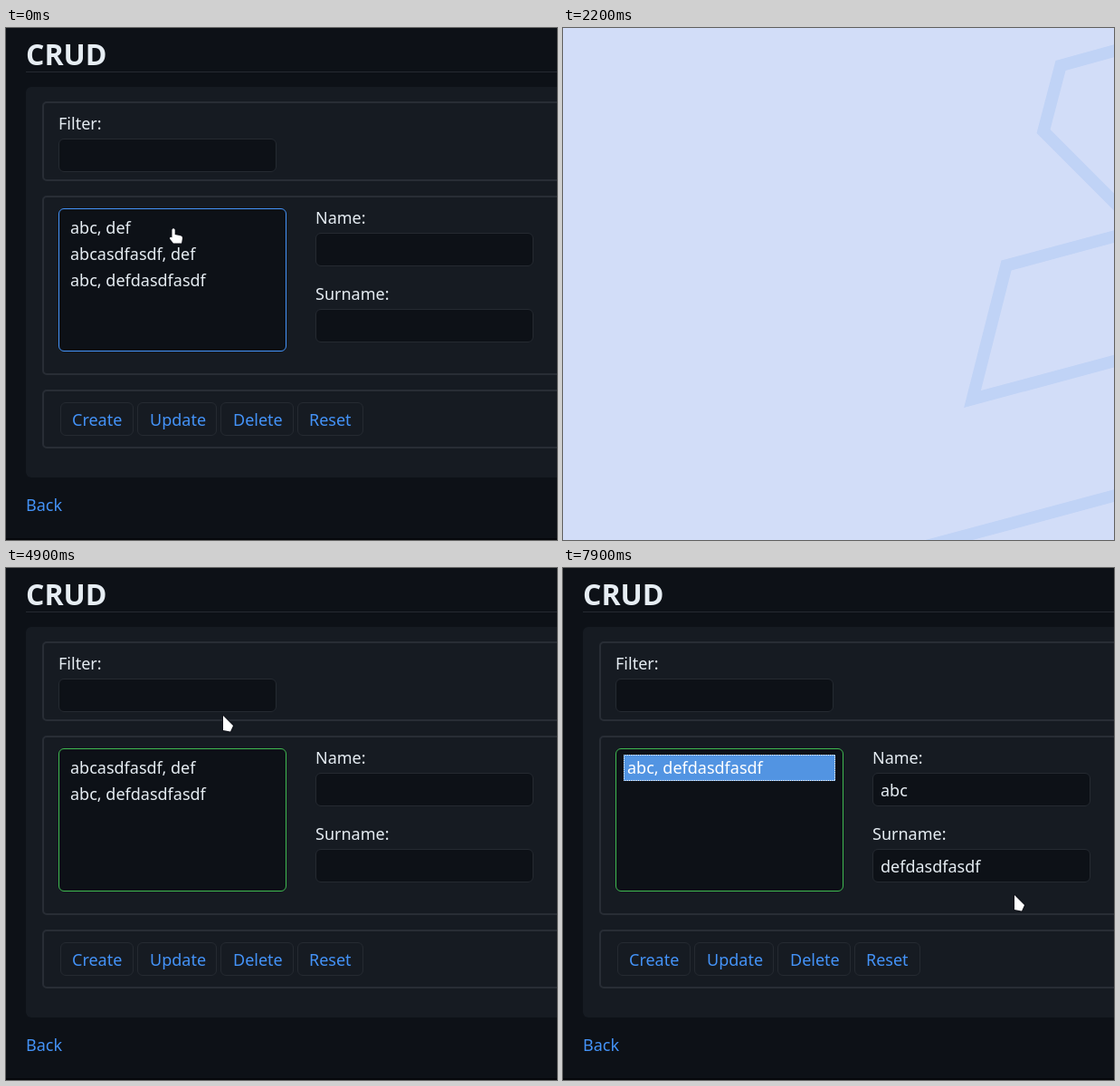
These frames come from a looping animation (609x565 px, 8000 ms). An HTML page:

```html
<!DOCTYPE html>
<html lang="en">
<head>
<meta charset="utf-8">
<title>CRUD</title>
<style>
  html, body { margin: 0; width: 100%; height: 100%; overflow: hidden; background: #0d1117; }
  svg { display: block; font: 18px "Noto Sans", sans-serif; }
  .small { font-size: 12.9px; }
  .dialog { filter: drop-shadow(0 2px 7px rgba(0, 0, 0, .3)); }
</style>
</head>
<body>
<svg id="stage" width="609" height="565" viewBox="0 0 609 565"></svg>
<script>
const LOOP = 8000, STEP = 100, MOVE = 300;
const INK = '#e6edf3', LINE = '#252a31', BG = '#0d1117', PANEL = '#161b22', BLUE = '#4493f8';
const people = [['abc', 'def'], ['abcasdfasdf', 'def'], ['abc', 'defdasdfasdf']];
const buttons = { Create: 81.7, Update: 88, Delete: 80.7, Reset: 73 };

// Each round: click the first row, then press a button until the end
const rounds = [
  { pick: 400, press: 1000, end: 2200, button: 'Delete' },
  { pick: 2900, press: 4200, end: 4300, button: 'Reset' },
  { pick: 5300, press: 6200, end: 7000, button: 'Delete' },
  { pick: 7600, press: LOOP, end: LOOP }
];
const reloads = rounds.filter(r => r.button === 'Delete').map(r => r.end);

// Pointer stops: arrival time, x, y
const stops = [
  [0, 185, 221], [500, 202, 222], [1000, 293, 425], [1600, 625, 496],
  [2800, 260, 230], [3300, 553, 404], [3900, 362, 428], [4900, 240, 163],
  [5200, 228, 218], [5700, 281, 409], [6200, 285, 422], [6400, 625, 496],
  [7500, 230, 222], [7900, 499, 361]
];

const text = (s, x, y, fill = INK, more = '') => `<text x="${x}" y="${y}" fill="${fill}" ${more}>${s}</text>`;
const rect = (x, y, w, h, fill, more = '') =>
  `<rect x="${x}" y="${y}" width="${w}" height="${h}" fill="${fill}" ${more}/>`;
const box = (x, y, w, h, fill, stroke = LINE, r = 5.5, sw = 1) =>
  rect(x + sw / 2, y + sw / 2, w - sw, h - sw, fill, `rx="${r}" stroke="${stroke}" stroke-width="${sw}"`);
const field = (label, value, x, y) =>
  text(label, x, y - 10) + box(x, y, 241, 37, BG) + text(value, x + 9, y + 26);
const mix = (a, b, k) => `rgb(${a.map((v, i) => Math.round(v + (b[i] - v) * k))})`;

// Waits at each stop, then moves just in time for the next one
function pointerAt(t) {
  const i = stops.findLastIndex(s => s[0] <= t);
  const [t0, x0, y0] = stops[i], [t1, x1, y1] = stops[i + 1] || [LOOP, x0, y0];
  const span = Math.min(MOVE, t1 - t0);
  const u = Math.max(0, (t - t1 + span) / span), k = u * u * (3 - 2 * u);
  return [x0 + (x1 - x0) * k, y0 + (y1 - y0) * k];
}

function pointer(x, y, hand) {
  const shape = hand
    ? 'M-1.5 1.5Q0-.8 1.7 1.5V7L8 8.2Q10.3 8.8 10 11L9 16.5H0L-4 11.5Q-4.2 9-1.5 10.2Z'
    : 'M0 0L11 11L8 17.5L0 16Z';
  return `<path d="${shape}" transform="translate(${x} ${y})" fill="#fff" stroke="#10131a" stroke-width="2"
    stroke-linejoin="round" paint-order="stroke"/>`;
}

function list(t, round, over) {
  const gone = reloads.filter(r => r <= t).length;
  const rows = people.slice(gone);
  const firstPick = rounds.find(r => r.pick >= (reloads[gone - 1] || 0)).pick;
  const valid = (t - firstPick - STEP) / 200;
  const border = valid >= 0 ? mix([68, 147, 248], [63, 185, 80], Math.min(1, valid))
    : over || round ? BLUE : LINE;
  const focused = round && t < round.press;
  const mark = !round ? '' : focused
    ? rect(67, 206, 234, 29, '#5294e2') + rect(67.5, 206.5, 233, 28, 'none',
      'stroke="#fff" stroke-dasharray="1" stroke-dashoffset=".5"')
    : rect(67, 206, 234, 29, '#e0e0e0');
  const [name, surname] = round && t > round.pick ? rows[0] : ['', ''];
  return box(58, 199, 252, 158, BG, border) + mark
    + rows.map((row, i) => text(row.join(', '), 71, 227 + 29 * i,
      i || !round ? INK : focused ? '#fff' : '#565c70')).join('')
    + field('Name:', name, 342, 226) + field('Surname:', surname, 342, 310);
}

function toolbar(pressed, px, py) {
  let left = 60;
  return Object.entries(buttons).map(([label, width]) => {
    const x = Math.floor(left), w = Math.floor(left + width) - x, tx = Math.round(left + 13);
    left += width + 4;
    const down = label === pressed;
    const hot = down || px >= x && px < x + w && py >= 413 && py < 450;
    return box(x, 413, w, 37, hot ? '#4089e8' : PANEL, hot ? '#4089e8' : LINE)
      + text(label, tx, 439, down ? '#c9d1d9' : hot ? INK : BLUE);
  }).join('');
}

const dialog = rect(0, 0, 609, 565, '#1c1b22', 'opacity=".45"')
  + rect(308, 398, 340, 131, '#42414d', 'rx="7" class="dialog"')
  + `<g fill="none" stroke="#fbfbfe" stroke-width="1.3"><circle cx="332.5" cy="422.5" r="7"/>
     <ellipse cx="332.5" cy="422.5" rx="3.2" ry="7"/><path d="M326 420h13M326 425h13"/></g>`
  + text('localhost:3000', 344, 427, '#fbfbfe', 'class="small" font-weight="700"')
  + text('Are you sure you want to delete?', 324, 462, '#fbfbfe', 'class="small"');

const flash = rect(0, 0, 609, 565, '#d2ddf8')
  + `<path d="M630 19.5L550 41.5L531 114L630 213M630 224.5L490 262L452.5 409.5L630 362M380 577.5L630 510.5"
     fill="none" stroke="#c0d3f6" stroke-width="13.5"/>`;

function page(t) {
  if (t === reloads[0]) return flash;
  const [px, py] = pointerAt(t);
  const round = rounds.find(r => t >= r.pick && t < r.end);
  const pressed = round && t >= round.press ? round.button : '';
  const modal = pressed === 'Delete' && t > round.press;
  const over = !modal && px >= 58 && px < 310 && py >= 199 && py < 357;
  return rect(0, 0, 609, 565, BG) + rect(0, 563, 609, 2, '#06080c')
    + text('CRUD', 22, 41, INK, 'font-size="32" font-weight="700"')
    + rect(22, 48, 587, 1, LINE)
    + rect(22, 65, 620, 431, PANEL, 'rx="6"')
    + [[81, 88], [185, 198], [399, 65]].map(([y, h]) => box(40, y, 600, h, 'none', '#282d35', 4, 2)).join('')
    + field('Filter:', '', 58, 122)
    + list(t, round, over)
    + toolbar(pressed, modal ? -1 : px, py)
    + text('Back', 22, 533, BLUE)
    + (modal ? dialog : '')
    + pointer(px, py, over);
}

const stage = document.getElementById('stage');
let last = -1;
function tick() {
  const t = Math.floor(performance.now() % LOOP / STEP) * STEP;
  if (t !== last) stage.innerHTML = page(last = t);
  requestAnimationFrame(tick);
}
tick();
</script>
</body>
</html>
```
